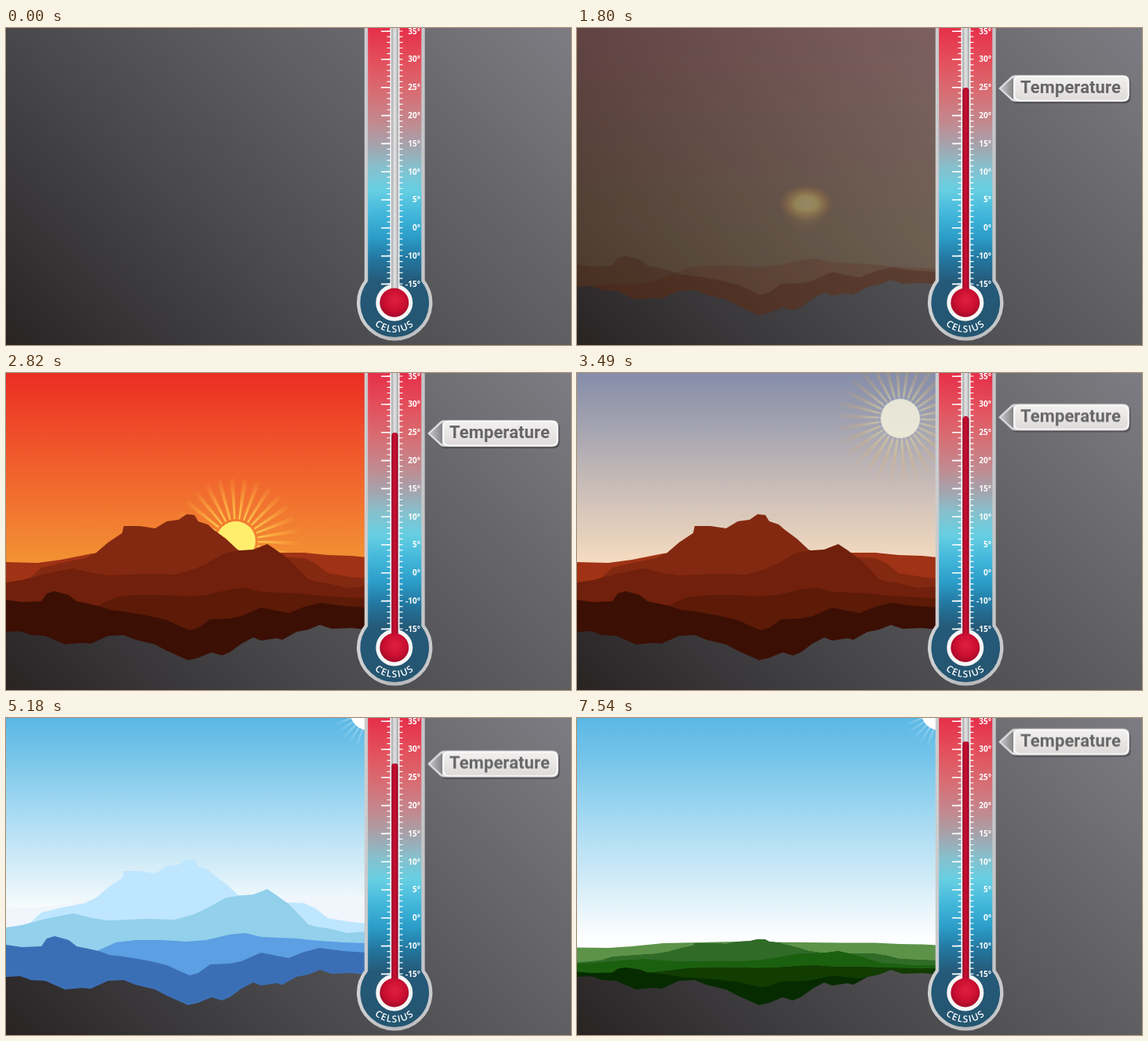
Write an HTML page that moves like this. It is 720 px wide and 404 px high and loops after 7.65 s.

```html
<!DOCTYPE html>
<html lang="en">
<head>
<meta charset="utf-8">
<title>Temperature</title>
<style>
  html, body { margin: 0; width: 100%; height: 100%; overflow: hidden; background: #444; }
  svg { display: block; width: 100vw; height: 100vh; }
  svg * { animation-duration: 7650ms; animation-iteration-count: infinite; animation-timing-function: linear; }

  .celsius { font: 600 12px "Open Sans", sans-serif; letter-spacing: 1.3px; fill: #fff; }
  .scale { font: 700 10px "Open Sans", sans-serif; fill: #fff; text-anchor: end; }
  .tag text { font: 700 22px Roboto, sans-serif; letter-spacing: .1px; fill: #666668; }

  .rise { animation-name: rise; animation-delay: var(--d, 0ms); opacity: 0; }
  .hill { animation-name: tint, flatten; animation-timing-function: ease-in-out; fill: var(--red); }
  .dusk { --h: 0px; --d: 40ms; }
  .day { animation-name: day, lower; animation-timing-function: ease-in-out; }
  .sun { animation-name: sun; animation-timing-function: ease-in-out; }
  .warm { animation-name: warm; }
  .cool { animation-name: day; }
  .rays { animation-name: shrink; }
  .glow { animation-name: glow; }
  .level { animation-name: level; animation-timing-function: ease-in-out; }
  .mercury { animation-name: fill; animation-timing-function: ease-in-out; }
  .tag { animation-name: slide; animation-timing-function: ease-out; }

  .far { --h: 20px; --d: 450ms; }
  .mid { --h: 23px; --d: 350ms; }
  .peak { --h: 20px; --d: 190ms; }
  .near { --h: 24px; --d: 30ms; }
  .front { --h: 16px; }
  .far .hill { --red: #a03215; --blue: #f0f6fb; --green: #5c9349; --s: .5; --y: 172px; }
  .mid .hill { --red: #842911; --blue: #bfe6ff; --green: #306b28; --s: .33; --y: 222.4px; }
  .peak .hill { --red: #70200c; --blue: #92d0ec; --green: #1b600f; --s: .33; --y: 225px; }
  .near .hill { --red: #5c1a07; --blue: #5c9fe2; --green: #123d02; --s: .3; --y: 233px; }
  .front .hill { --red: #3b0f04; --blue: #3b6fb5; --green: #062b00; --s: .5; --y: 179px; }

  @keyframes rise {
    0%, 22.1% { opacity: 0; transform: translateY(var(--h)); }
    28%, 100% { opacity: 1; transform: none; }
  }
  @keyframes tint {
    0%, 56.2% { fill: var(--red); }
    65.4%, 79% { fill: var(--blue); }
    91%, 100% { fill: var(--green); }
  }
  @keyframes flatten {
    0%, 79% { transform: translateY(0) scaleY(1); }
    91%, 100% { transform: translateY(var(--y)) scaleY(var(--s)); }
  }
  @keyframes day {
    0%, 38.5% { opacity: 0; }
    50%, 100% { opacity: 1; }
  }
  @keyframes warm {
    0%, 38.5% { opacity: 1; }
    50%, 100% { opacity: 0; }
  }
  @keyframes lower {
    0%, 79% { transform: scaleY(1); }
    91%, 100% { transform: scaleY(1.12); }
  }
  @keyframes sun {
    0%, 28% { opacity: 0; transform: translate(293px, 222px); }
    34%, 38.5% { opacity: 1; transform: translate(293px, 214px); }
    50%, 100% { opacity: 1; transform: translate(463px, -9px); }
  }
  @keyframes shrink {
    0%, 38.5% { transform: scale(1); }
    50%, 100% { transform: scale(.8); }
  }
  @keyframes glow {
    0%, 22.1% { opacity: 0; }
    28% { opacity: 1; }
    34%, 100% { opacity: 0; }
  }
  @keyframes level {
    0%, 38.5% { transform: translateY(0); }
    50%, 56.2% { transform: translateY(-29.5px); }
    65.4%, 79% { transform: translateY(-18.5px); }
    91%, 100% { transform: translateY(-46.5px); }
  }
  @keyframes fill {
    0%, 2% { transform: translateY(262px); }
    13%, 100% { transform: translateY(0); }
  }
  @keyframes slide {
    0%, 4% { transform: translateX(190px); }
    11%, 100% { transform: translateX(0); }
  }
</style>
</head>
<body>
<svg viewBox="0 0 720 404" preserveAspectRatio="none">
  <defs>
    <linearGradient id="wall" gradientUnits="userSpaceOnUse" x1="0" y1="404" x2="562" y2="-158">
      <stop offset="0" stop-color="#292323"/>
      <stop offset=".18" stop-color="#383638"/>
      <stop offset=".36" stop-color="#48474a"/>
      <stop offset=".65" stop-color="#606063"/>
      <stop offset="1" stop-color="#7c7c82"/>
    </linearGradient>
    <linearGradient id="duskSky" gradientUnits="userSpaceOnUse" x1="0" y1="0" x2="0" y2="260">
      <stop offset="0" stop-color="#ec2d24"/>
      <stop offset=".4" stop-color="#f0592b"/>
      <stop offset="1" stop-color="#f39a35"/>
    </linearGradient>
    <linearGradient id="daySky" gradientUnits="userSpaceOnUse" x1="0" y1="0" x2="0" y2="250">
      <stop offset="0" stop-color="#5ab8e5"/>
      <stop offset=".2" stop-color="#78c6ea"/>
      <stop offset=".5" stop-color="#abdcf3"/>
      <stop offset=".8" stop-color="#dcf0f9"/>
      <stop offset="1" stop-color="#fdfeff"/>
    </linearGradient>
    <linearGradient id="body" gradientUnits="userSpaceOnUse" x1="0" y1="0" x2="0" y2="404">
      <stop offset="0" stop-color="#e52f4a"/>
      <stop offset=".1" stop-color="#e44e5b"/>
      <stop offset=".2" stop-color="#d86c72"/>
      <stop offset=".3" stop-color="#c18a90"/>
      <stop offset=".37" stop-color="#a5a3ac"/>
      <stop offset=".44" stop-color="#86c0cd"/>
      <stop offset=".51" stop-color="#67cfe2"/>
      <stop offset=".58" stop-color="#45b9dc"/>
      <stop offset=".66" stop-color="#2b9dc8"/>
      <stop offset=".73" stop-color="#23769f"/>
      <stop offset=".8" stop-color="#255a79"/>
      <stop offset="1" stop-color="#24546e"/>
    </linearGradient>
    <linearGradient id="rim" gradientUnits="userSpaceOnUse" x1="447" y1="0" x2="543" y2="0">
      <stop offset="0" stop-color="#d2d3d5"/>
      <stop offset=".5" stop-color="#b4b6b9"/>
      <stop offset="1" stop-color="#c9cacc"/>
    </linearGradient>
    <linearGradient id="glass">
      <stop offset="0" stop-color="#a9abad"/>
      <stop offset=".5" stop-color="#e3e3e4"/>
      <stop offset="1" stop-color="#a5a6a9"/>
    </linearGradient>
    <linearGradient id="red">
      <stop offset="0" stop-color="#9c0826"/>
      <stop offset=".5" stop-color="#cb1033"/>
      <stop offset="1" stop-color="#9c0626"/>
    </linearGradient>
    <radialGradient id="ball" cx=".52" cy=".42" r=".6">
      <stop offset="0" stop-color="#e0203f"/>
      <stop offset=".6" stop-color="#cb0f32"/>
      <stop offset="1" stop-color="#a00a28"/>
    </radialGradient>
    <linearGradient id="plate" x2="0" y2="1">
      <stop offset="0" stop-color="#f3f1f0"/>
      <stop offset="1" stop-color="#dedbda"/>
    </linearGradient>
    <linearGradient id="tip">
      <stop offset="0" stop-color="#c4c4c6"/>
      <stop offset="1" stop-color="#858588"/>
    </linearGradient>
    <radialGradient id="warmRay" gradientUnits="userSpaceOnUse" cx="0" cy="0" r="80">
      <stop offset=".35" stop-color="#ffd254" stop-opacity=".9"/>
      <stop offset="1" stop-color="#ffb040" stop-opacity=".1"/>
    </radialGradient>
    <radialGradient id="coolRay" gradientUnits="userSpaceOnUse" cx="0" cy="0" r="62">
      <stop offset=".4" stop-color="#e4f6fd" stop-opacity=".5"/>
      <stop offset="1" stop-color="#d4f0fb" stop-opacity="0"/>
    </radialGradient>
    <radialGradient id="halo">
      <stop offset="0" stop-color="#fffcae"/>
      <stop offset=".4" stop-color="#fff27a"/>
      <stop offset=".65" stop-color="#fbc652" stop-opacity=".6"/>
      <stop offset="1" stop-color="#f0903a" stop-opacity="0"/>
    </radialGradient>
    <clipPath id="land">
      <path d="M0 0H460V327L440 325 415 326 400 321 385 327 370 330 352 340 345 338 325 341 315 337 300 345 285 356 275 360 262 356 252 360 245 363 232 366 205 354 190 346 165 340 150 334 130 335 108 345 97 344 75 346 50 335 32 334 18 329 0 330Z"/>
    </clipPath>
    <clipPath id="bore"><path d="M480 0H510V340H480Z"/></clipPath>
    <path id="arc" d="M457 350A38 38 0 0 0 533 350"/>
    <circle id="spokes" r="54" fill="none" stroke-width="52" stroke-dasharray="4 7.31"/>
    <path id="plateShape" d="M537 77L553 62Q555 60 558 60H696Q704 60 704 68V86Q704 94 696 94H558Q555 94 553 92Z"/>
  </defs>

  <rect width="720" height="404" fill="url(#wall)"/>

  <g clip-path="url(#land)">
    <g class="rise dusk">
      <rect width="460" height="404" fill="url(#duskSky)"/>
      <rect class="glow" width="460" height="404" fill="#d4602e" fill-opacity=".35"/>
      <rect class="day" width="460" height="404" fill="url(#daySky)"/>
    </g>
    <g class="sun">
      <g class="warm">
        <use href="#spokes" stroke="url(#warmRay)"/>
        <circle r="25" fill="#ffee6c"/>
      </g>
      <g class="cool">
        <g class="rays"><use href="#spokes" stroke="url(#coolRay)"/></g>
        <circle r="25" fill="#fff"/>
      </g>
    </g>
    <g class="rise far">
      <path class="hill" d="M0 1200V241L40 242 70 238 110 230 200 226 340 229 380 229 410 232 440 233 460 235V1200Z"/>
    </g>
    <g class="rise mid">
      <path class="hill" d="M0 1200V270L30 262 45 248 70 242 100 236 115 229 130 216 148 204 150 195 170 195 190 198 205 189 220 187 230 180 240 181 245 189 257 193 265 200 280 211 295 225 320 236 360 235 380 236 395 243 410 255 440 260 460 262V1200Z"/>
    </g>
    <ellipse class="glow" cx="292" cy="223" rx="36" ry="23" fill="url(#halo)"/>
    <g class="rise peak">
      <path class="hill" d="M0 1200V267L20 264 50 256 85 249 110 255 130 258 180 256 215 257 240 250 255 243 280 229 300 226 315 225 333 218 345 226 360 237 375 252 385 263 395 266 410 268 435 274 460 272V1200Z"/>
    </g>
    <ellipse class="glow" cx="292" cy="230" rx="32" ry="32" fill="url(#halo)" fill-opacity=".35"/>
    <g class="rise near">
      <path class="hill" d="M0 1200V310L90 305 118 296 140 286 165 283 200 283 230 285 255 283 285 276 305 274 325 279 370 281 400 284 430 286 460 287V1200Z"/>
    </g>
    <g class="rise front">
      <path class="hill" d="M0 1200V289L20 292 45 291 52 281 62 278 80 283 90 291 105 294 118 297 132 302 150 304 180 309 205 315 220 322 234 328 245 325 260 314 285 313 300 310 325 299 345 303 360 306 380 298 400 293 430 297 460 299V1200Z"/>
    </g>
  </g>

  <path d="M459-10V322A46 46 0 1 0 531.5 322V-10Z" fill="url(#body)" stroke="url(#rim)" stroke-width="4.4"/>
  <g stroke="#fff" fill="none">
    <path d="M484 3.4V328" stroke-width="12" stroke-dasharray="1.6 34.2"/>
    <path d="M488 3.4V328M503 3.4V328" stroke-width="5" stroke-dasharray="1.2 5.96"/>
  </g>
  <text class="scale" y="-28.2"><tspan x="528" dy="35.8">35°</tspan><tspan x="528" dy="35.8">30°</tspan><tspan x="528" dy="35.8">25°</tspan><tspan x="528" dy="35.8">20°</tspan><tspan x="528" dy="35.8">15°</tspan><tspan x="528" dy="35.8">10°</tspan><tspan x="528" dy="35.8">5°</tspan><tspan x="528" dy="35.8">0°</tspan><tspan x="528" dy="35.8">-10°</tspan><tspan x="528" dy="35.8">-15°</tspan></text>
  <text class="celsius" text-anchor="middle"><textPath href="#arc" startOffset="50%">CELSIUS</textPath></text>

  <circle cx="494.8" cy="350" r="23.5" fill="#f6f6f6"/>
  <rect x="489.5" y="-5" width="12" height="338" fill="#f3f3f3"/>
  <rect x="491" y="-5" width="9" height="340" fill="url(#glass)"/>
  <g clip-path="url(#bore)">
    <g class="level"><rect class="mercury" x="491.3" y="76" width="8.2" height="500" rx="4" fill="url(#red)"/></g>
  </g>
  <circle cx="494.8" cy="350" r="18.5" fill="url(#ball)"/>

  <g class="level">
    <g class="tag">
      <use href="#plateShape" x="1.5" y="2" fill="#000" opacity=".35"/>
      <use href="#plateShape" fill="#e2e2e3" stroke="#8b8b8d" stroke-width=".8"/>
      <path d="M540 77L556 63V91Z" fill="url(#tip)"/>
      <rect x="557.5" y="61.5" width="145" height="31" rx="6.5" fill="url(#plate)" stroke="#fff" stroke-width="1.5"/>
      <text x="565" y="83">Temperature</text>
    </g>
  </g>
</svg>
</body>
</html>
```
